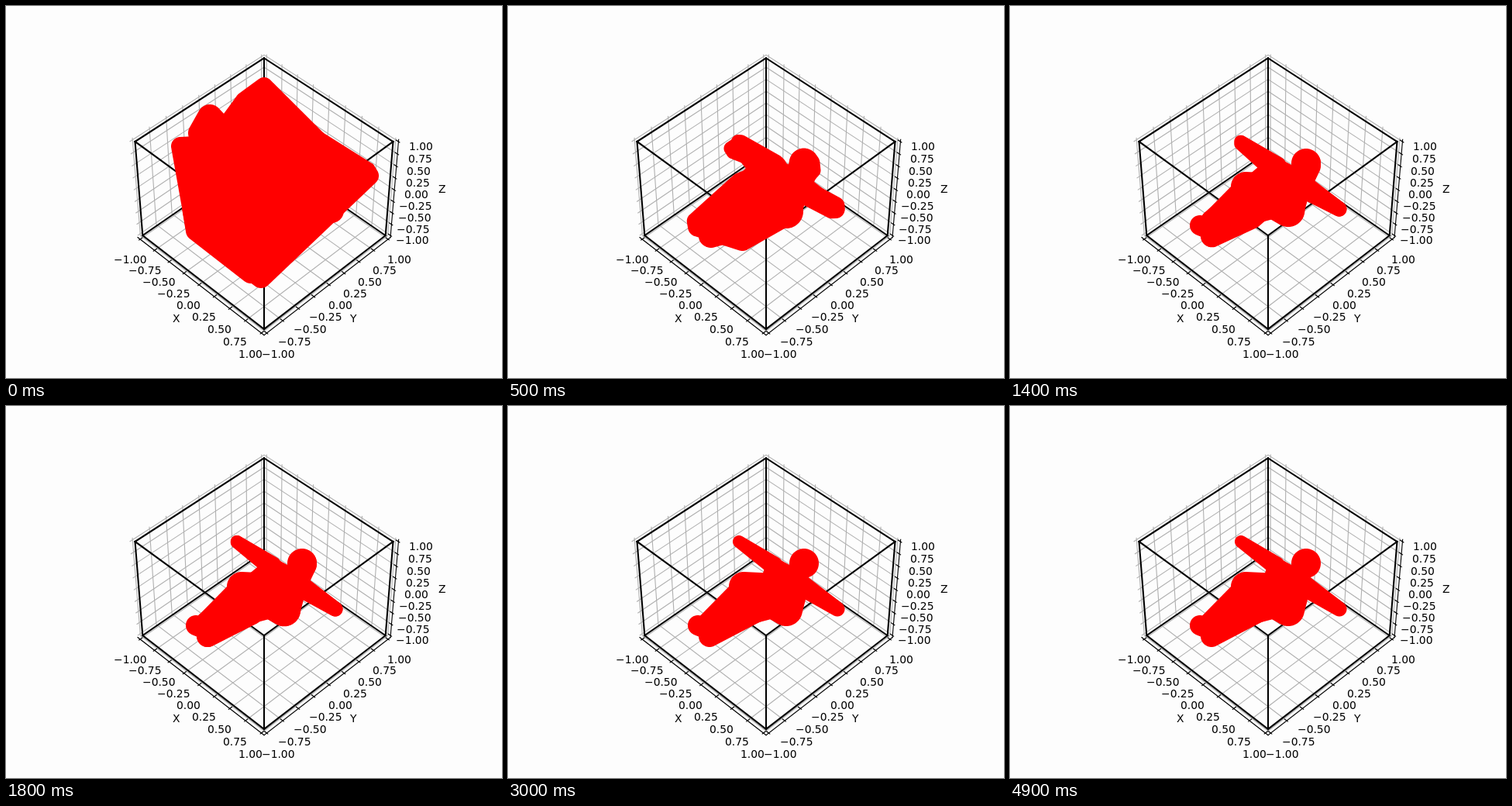
Animation, 640 px wide and 480 px high, one loop 5 s. Source, as an HTML page with a canvas:

```html
<!DOCTYPE html>
<html lang="en">
<head>
<meta charset="utf-8">
<title>Shape carving</title>
<style>
  html, body { margin: 0; width: 100%; height: 100%; overflow: hidden; background: #fdfdfd; }
  canvas { display: block; }
</style>
</head>
<body>
<canvas id="stage" width="640" height="480"></canvas>
<script>
const ctx = document.getElementById('stage').getContext('2d');
const LOOP = 5000, STEP = 100;
const WALL = 1 + 1 / 24;      // the grid walls lie just outside the box
const LABEL = WALL + 0.173;   // distance of tick labels
const TITLE = WALL + 0.376;   // distance of axis titles
const TICKS = Array.from({ length: 9 }, (_, i) => -1 + i / 4);

// Perspective view from 45 degrees up, facing the x = 1, y = -1 edge.
function project([x, y, z]) {
  const h = Math.SQRT1_2;
  const side = (x + y) * 0.5714 * h;
  const near = (x - y) * 0.5714 * h;
  const up = z * 0.4286;
  const scale = 1997.8 / (10 - (near + up) * h);
  return [333 + side * scale, 237.4 - (up - near) * h * scale];
}

function line(color, width, cap, ...points) {
  ctx.beginPath();
  points.forEach(p => ctx.lineTo(...project(p)));
  ctx.strokeStyle = color;
  ctx.lineWidth = width;
  ctx.lineCap = cap;
  ctx.stroke();
}

const gridLine = (...points) => line('#b0b0b0', 1.11, 'butt', ...points);
const axisLine = (...points) => line('#000', 1.11, 'square', ...points);
const boxLine = (...points) => line('#000', 2.08, 'square', ...points);

function label(text, point, drop) {
  const [x, y] = project(point);
  const left = x - ctx.measureText(text).width / 2;
  ctx.fillText(text, Math.round(left + 0.7), Math.round(y + drop));
}

const AXES = [
  { name: 'X', at: (t, d) => [t, -d, -d], tick: (t, d) => [t, -d, -WALL],
    grid: t => [[t, -WALL, -WALL], [t, WALL, -WALL], [t, WALL, WALL]] },
  { name: 'Y', at: (t, d) => [d, t, -d], tick: (t, d) => [d, t, -WALL],
    grid: t => [[WALL, t, -WALL], [-WALL, t, -WALL], [-WALL, t, WALL]] },
  { name: 'Z', at: (t, d) => [d, d, t], tick: (t, d) => [d, WALL, t],
    grid: t => [[-WALL, -WALL, t], [-WALL, WALL, t], [WALL, WALL, t]] }
];

function drawPlot() {
  ctx.fillStyle = '#fdfdfd';
  ctx.fillRect(0, 0, 640, 480);
  for (const { grid } of AXES) TICKS.forEach(t => gridLine(...grid(t)));

  ctx.fillStyle = '#000';
  ctx.font = '13.89px "DejaVu Sans", sans-serif';
  for (const { name, at, tick } of AXES) {
    axisLine(at(-WALL, WALL), at(WALL, WALL));
    for (const t of TICKS) {
      axisLine(tick(t, WALL + 0.0167), tick(t, WALL - 0.0333));
      label(t.toFixed(2).replace('-', '\u2212'), at(t, LABEL), 11);
    }
    label(name, at(0, TITLE), 4);
  }

  for (const a of [-1, 1]) for (const b of [-1, 1]) {
    boxLine([-1, a, b], [1, a, b]);
    boxLine([a, -1, b], [a, 1, b]);
    boxLine([a, b, -1], [a, b, 1]);
  }
}

// Every part is the convex hull of a few balls [x, y, radius].
const FIGURE = [
  [[382, 203, 18]],                                                       // head
  [[298, 175, 7], [343, 206, 11]],                                        // left arm
  [[425, 262, 8.5], [375, 229, 13]],                                      // right arm
  [[345, 211, 13], [374, 228, 14], [359, 263, 20], [340, 252, 20]],       // chest
  [[304, 233, 18], [318, 262, 17], [340, 252, 21], [345, 232, 15]],       // hips
  [[260, 297, 13], [258, 279, 12], [302, 240, 16], [318, 262, 17]],       // legs
  [[245, 283, 12], [262, 291, 11]]                                        // foot
];
const SLACK = [
  [[297, 175, 8], [296, 183, 7], [322, 203, 15], [345, 208, 14]],
  [[327, 216, 18], [262, 272, 12], [318, 262, 17]],
  [[424, 262, 9], [387, 243, 14]],
  [[388, 203, 12], [391, 212, 9], [378, 228, 14]],
  [[359, 265, 21], [345, 258, 20]],
  [[298, 288, 13], [318, 264, 18], [262, 297, 14]]
];
const SLAB = [
  [[262, 186, 11], [308, 178, 13], [274, 206, 10], [345, 200, 17]],
  [[233, 261, 5], [245, 290, 12], [316, 344, 13], [368, 262, 12], [340, 215, 15], [290, 222, 3]],
  [[381, 201, 18], [392, 203, 14], [400, 212, 10], [370, 225, 15]],
  [[418, 246, 17], [420, 264, 15], [398, 270, 10], [385, 240, 15]]
];
const CONE = [
  [[225, 181, 11], [245, 287, 12], [329, 351, 12], [469, 219, 11], [466, 212, 10], [400, 173, 12]],
  [[333, 103, 10], [307, 122, 10], [290, 152, 14], [400, 171, 11]],
  [[263, 143, 15], [250, 164, 14], [290, 170, 14]]
];
const STAGES = [CONE, SLAB, SLACK, FIGURE];
const STARTS = [0, 200, 800, 2300];
const MARKER = 1;   // the plotted dots widen the outline

// Walks round the hull: in each direction the outermost ball gives the point.
function fillHull(balls) {
  ctx.beginPath();
  for (let i = 0; i < 180; i++) {
    const c = Math.cos(i * Math.PI / 90), s = Math.sin(i * Math.PI / 90);
    const reach = ([x, y, r]) => x * c + y * s + r;
    const [x, y, r] = balls.reduce((a, b) => reach(b) > reach(a) ? b : a);
    ctx.lineTo(x + (r + MARKER) * c, y + (r + MARKER) * s);
  }
  ctx.fill();
}

// Moves a ball towards the nearest ball of what remains.
function sink(ball, targets, f) {
  const gap = b => Math.hypot(b[0] - ball[0], b[1] - ball[1]);
  const goal = targets.reduce((a, b) => gap(b) < gap(a) ? b : a, targets[0]);
  return ball.map((v, i) => v + (goal[i] - v) * f);
}

function drawShape(time) {
  const i = STARTS.findLastIndex(start => start <= time);
  const rest = STAGES.slice(i + 1).flat();
  ctx.fillStyle = '#f00';
  rest.forEach(fillHull);
  if (!rest.length) return STAGES[i].forEach(fillHull);
  const left = 1 - (time - STARTS[i]) / (STARTS[i + 1] - STARTS[i]);
  for (const part of STAGES[i]) fillHull(part.map(ball => sink(ball, rest.flat(), 1 - left * left)));
}

let shown = -1;
function render() {
  const time = Math.floor(performance.now() % LOOP / STEP) * STEP;
  if (time !== shown) {
    shown = time;
    drawPlot();
    drawShape(time);
  }
  requestAnimationFrame(render);
}
render();
</script>
</body>
</html>
```
